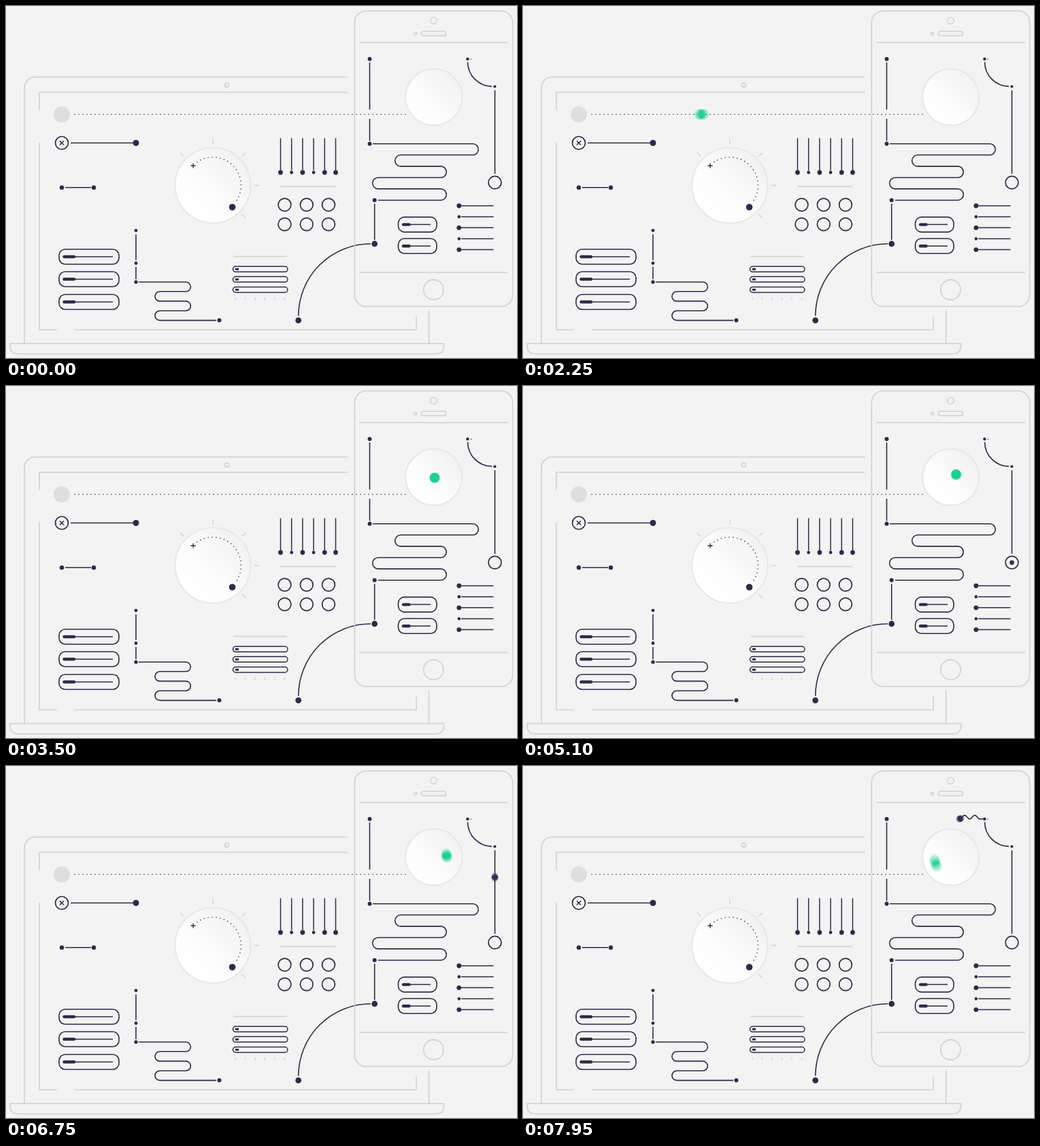
Recreate the animation shown at these times as an HTML page with a canvas. Size 751 px wide and 518 px high, loop 8000 ms.

```html
<!DOCTYPE html>
<html lang="en">
<head>
<meta charset="utf-8">
<title>Connected devices</title>
<style>
  html, body { margin: 0; width: 100%; height: 100%; overflow: hidden; background: #f3f3f3; }
  canvas { display: block; width: 751px; height: 518px; }
</style>
</head>
<body>
<canvas id="stage" width="751" height="518"></canvas>
<script>
const W = 751, H = 518, LOOP = 8000, STEP = 50;
const BG = '#f3f3f3', GREY = '#d1d1d1', DARK = '#2c2b48', GREEN = '#1fd491';
const SHUTTER = 22, SAMPLES = 16;

const stage = document.getElementById('stage').getContext('2d');
const makeLayer = () => {
  const c = document.createElement('canvas');
  c.width = W;
  c.height = H;
  return c.getContext('2d');
};
const scene = makeLayer(), blur = makeLayer();

// ---- drawing helpers ----
function path(d, color = DARK, width = 1.6) {
  scene.strokeStyle = color;
  scene.lineWidth = width;
  scene.stroke(new Path2D(d));
}
const hLine = (x1, x2, y, color, width) => path(`M${x1} ${y}H${x2}`, color, width);
const vLine = (x, y1, y2, color, width) => path(`M${x} ${y1}V${y2}`, color, width);

function dot(ctx, x, y, r, color = DARK) {
  ctx.fillStyle = color;
  ctx.beginPath();
  ctx.arc(x, y, r, 0, Math.PI * 2);
  ctx.fill();
}
const spot = (x, y, r, color) => dot(scene, x, y, r, color);

function ring(x, y, r, color = DARK, width = 1.7) {
  scene.strokeStyle = color;
  scene.lineWidth = width;
  scene.beginPath();
  scene.arc(x, y, r, 0, Math.PI * 2);
  scene.stroke();
}

function box(x, y, w, h, r, color = DARK, width = 1.6) {
  scene.strokeStyle = color;
  scene.lineWidth = width;
  scene.beginPath();
  scene.roundRect(x, y, w, h, r);
  scene.stroke();
}

function dial(x, y, r) {
  const fill = scene.createLinearGradient(x - r * .7, y + r * .7, x + r * .7, y - r * .7);
  fill.addColorStop(0, '#ffffff');
  fill.addColorStop(.35, '#fdfdfd');
  fill.addColorStop(1, '#f2f2f2');
  spot(x, y, r, fill);
  ring(x, y, r, '#e8e8e8', 2.2);
}

function slider(x, y, w, thick, end) {
  box(x, y - 11, w, 22, 9);
  hLine(x + 7, end, y, DARK, 1.5);
  scene.lineCap = 'round';
  hLine(x + 7.5, x + thick, y, DARK, 4.4);
  scene.lineCap = 'butt';
}

// ---- still parts ----
function drawLaptop() {
  path('M502.5 104.5H43A16 16 0 0 0 27 120.5V496', GREY);
  vLine(621.6, 448, 496, GREY);
  path('M6 496.7H643.5V500Q643.5 512 631 512H18.5Q6 512 6 500Z', GREY);
  ring(324.5, 116.2, 3, GREY, 1.5);
  path('M502.5 127H49V153M49 201V476.5H75M101 476.5H603V457', GREY);
  spot(82, 159.5, 12, '#dfdfdf');

  ring(82, 201.5, 9.5);
  path('M79 198.5L85 204.5M85 198.5L79 204.5');
  hLine(95, 187, 201.5);
  spot(191, 201.5, 4.5);
  spot(82, 267.2, 3.2);
  hLine(87, 125, 267.2);
  spot(129, 267.2, 3.2);
  for (const y of [369, 402, 435.5]) slider(78, y, 88, 22, 157);

  spot(191, 330.3, 2.4);
  vLine(191, 336, 374);
  spot(191, 378.5, 2.4);
  vLine(191, 384, 402);
  spot(191, 406.2, 2.6);
  path('M195 406.2H264.3a7 7 0 0 1 0 14.1H226a7 7 0 0 0 0 14.1H264.3a7 7 0 0 1 0 14.1H226a7 7 0 0 0 0 14.1H309');
  spot(313.5, 462.6, 3);
}

function drawBigDial() {
  const cx = 304, cy = 264;
  dial(cx, cy, 55.5);
  for (const deg of [-135, -90, -45, 0, 45]) {
    const c = Math.cos(deg * Math.PI / 180), s = Math.sin(deg * Math.PI / 180);
    path(`M${cx + 60.5 * c} ${cy + 60.5 * s}L${cx + 68 * c} ${cy + 68 * s}`, GREY, 1.4);
  }
  path('M271.5 235H278.7M275.1 231.4V238.6', DARK, 1.3);
  for (let deg = -124; deg < 40; deg += 8.2) {
    const a = deg * Math.PI / 180;
    spot(cx + 41.5 * Math.cos(a), cy + 41.5 * Math.sin(a), .8);
  }
  spot(332.6, 296, 4.8);
}

function drawControls() {
  for (let i = 0; i < 6; i++) {
    const x = 403.5 + i * 16.2;
    vLine(x, 194.5, 242, DARK, 1.5);
    spot(x, 245, i === 1 || i === 3 ? 2.4 : 3.4);
    vLine(337 + i * 14.5, 428.5, 433, GREY, 1.2);
  }
  hLine(403.5, 484.5, 265.6, GREY);
  for (const y of [292.5, 321.3])
    for (const x of [409.5, 441.8, 474]) ring(x, y, 9.4);

  hLine(334.5, 413, 368.5, GREY);
  for (const y of [387.3, 402.3, 417.5]) {
    box(333.5, y - 4, 80.5, 8, 4, DARK, 1.5);
    hLine(337, 342, y, DARK, 3);
  }
  spot(429.7, 462.6, 4.4);
  path('M429.8 456A106 106 0 0 1 536 350');
  spot(541.7, 350, 4.4);
  vLine(541.7, 291, 344);
}

function drawPhone() {
  box(512.4, 7.2, 232.3, 435, 17, GREY);
  hLine(519, 738, 53.7, GREY);
  hLine(519, 738, 392, GREY);
  ring(628.4, 21.6, 4.8, GREY, 1.5);
  ring(601.7, 40.6, 2.1, GREY, 1.4);
  box(610.5, 37.2, 36, 6.4, 3.2, GREY);
  ring(628.4, 417.6, 14.7, GREY, 1.6);
  dial(628.7, 134.2, 41.5);

  spot(534.5, 78, 3);
  path('M534.5 83V152.5M534.5 166V198.5');
  spot(534.5, 202.7, 3);
  path('M539 202.7H686a8.3 8.3 0 0 1 0 16.6H580a8.3 8.3 0 0 0 0 16.6H639a8.3 8.3 0 0 1 0 16.6H547a8.3 8.3 0 0 0 0 16.6H639a8.3 8.3 0 0 1 0 16.6H547');
  spot(541.7, 285.8, 3);

  spot(678.4, 78, 2.2);
  spot(683.4, 78.3, .8);
  path('M678.6 82.5A36 36 0 0 0 714 118.4');
  spot(718.4, 118.5, 2.1);
  vLine(718.5, 124, 247);
  ring(718.5, 259.8, 9.4);

  for (let i = 0; i < 5; i++) {
    const y = 294 + i * 16.15;
    spot(665.8, y, i % 2 ? 2.3 : 3.4);
    hLine(669, 716.5, y, DARK, 1.5);
  }
  for (const y of [321.6, 353.2]) slider(576.5, y, 56.5, 16, 624);
}

function drawStill() {
  scene.fillStyle = BG;
  scene.fillRect(0, 0, W, H);
  drawLaptop();
  drawBigDial();
  drawControls();
  drawPhone();
  for (let x = 101; x < 589; x += 6) spot(x, 159.5, .8);
}

// ---- motion ----
const svgPath = d => {
  const el = document.createElementNS('http://www.w3.org/2000/svg', 'path');
  el.setAttribute('d', d);
  return el;
};

const waveY = x => x > 671.5 ? 78 : 75.3 + 2.7 * Math.cos((x - 671.5) / 15 * 2 * Math.PI);

function waveTo(end) {
  let d = '';
  for (let x = 677; x > end; x--) d += `L${x} ${waveY(x)}`;
  return d + `L${end} ${waveY(end)}`;
}

const WAVE_END = 642.5;
const greenTrack = svgPath('M82.3 159.4H596C612 160.5 629 157 634 149.5C638.5 142.5 636 135 630 135');
const darkTrack = svgPath('M718.5 259.8V118.5A40 40 0 0 1 678.4 78' + waveTo(WAVE_END - 6));
const fullTrack = svgPath('M718.5 259.8V118.5A40 40 0 0 1 678.4 78' + waveTo(WAVE_END));
const greenLen = greenTrack.getTotalLength();
const darkLen = fullTrack.getTotalLength();

// Keys are [time, distance, speed].
const greenKeys = [[1450, 0, 0], [2250, 180, .42], [3100, greenLen - 19, .11], [3500, greenLen, 0]];
const darkKeys = [[6150, 0, 0], [6750, 96, .19], [7950, darkLen, .16], [8000, darkLen + 8, .16]];

function travel(keys, t) {
  if (t <= keys[0][0]) return keys[0][1];
  for (let i = 1; i < keys.length; i++) {
    const [t0, p0, v0] = keys[i - 1], [t1, p1, v1] = keys[i];
    if (t > t1) continue;
    const h = t1 - t0, u = (t - t0) / h, w = 1 - u;
    return w * w * ((1 + 2 * u) * p0 + u * h * v0) + u * u * ((1 + 2 * w) * p1 - w * h * v1);
  }
  return keys[keys.length - 1][1];
}

function ease(t, from, to) {
  const u = Math.min(1, Math.max(0, (t - from) / (to - from)));
  return u * u * (3 - 2 * u);
}

function greenAt(t) {
  if (t < 3700) return greenTrack.getPointAtLength(travel(greenKeys, t));
  const s = Math.max(0, t - 3750) / 1000;
  const a = (-95 + 18.5 * s + 227 * s * s - 7.9 * s ** 3) * Math.PI / 180;
  return { x: 630 + 6 * s * Math.cos(a), y: 135 + 6 * s * Math.sin(a) };
}

const darkAt = t => darkTrack.getPointAtLength(travel(darkKeys, t));

function drawMoving(t) {
  const greenR = 7.6 * ease(t, 150, 1000), darkR = 5 * ease(t, 4600, 5400);
  blur.clearRect(0, 0, W, H);
  blur.globalCompositeOperation = 'lighter';
  blur.globalAlpha = 1 / SAMPLES;
  for (let i = 0; i < SAMPLES; i++) {
    const at = t + ((i + .5) / SAMPLES - .5) * SHUTTER;
    const g = greenAt(at), d = darkAt(at);
    if (greenR > 0) dot(blur, g.x, g.y, greenR, GREEN);
    if (darkR > 0) dot(blur, d.x, d.y, darkR);
  }
  const head = darkAt(t);
  if (head.x < 677) {
    stage.strokeStyle = DARK;
    stage.lineWidth = 1.6;
    stage.stroke(new Path2D('M678.4 78' + waveTo(head.x)));
  }
  stage.drawImage(blur.canvas, 0, 0);
}

drawStill();
const start = performance.now();
function frame() {
  const now = (performance.now() - start) % LOOP;
  stage.drawImage(scene.canvas, 0, 0);
  drawMoving(Math.floor(now / STEP) * STEP);
  requestAnimationFrame(frame);
}
frame();
</script>
</body>
</html>
```
